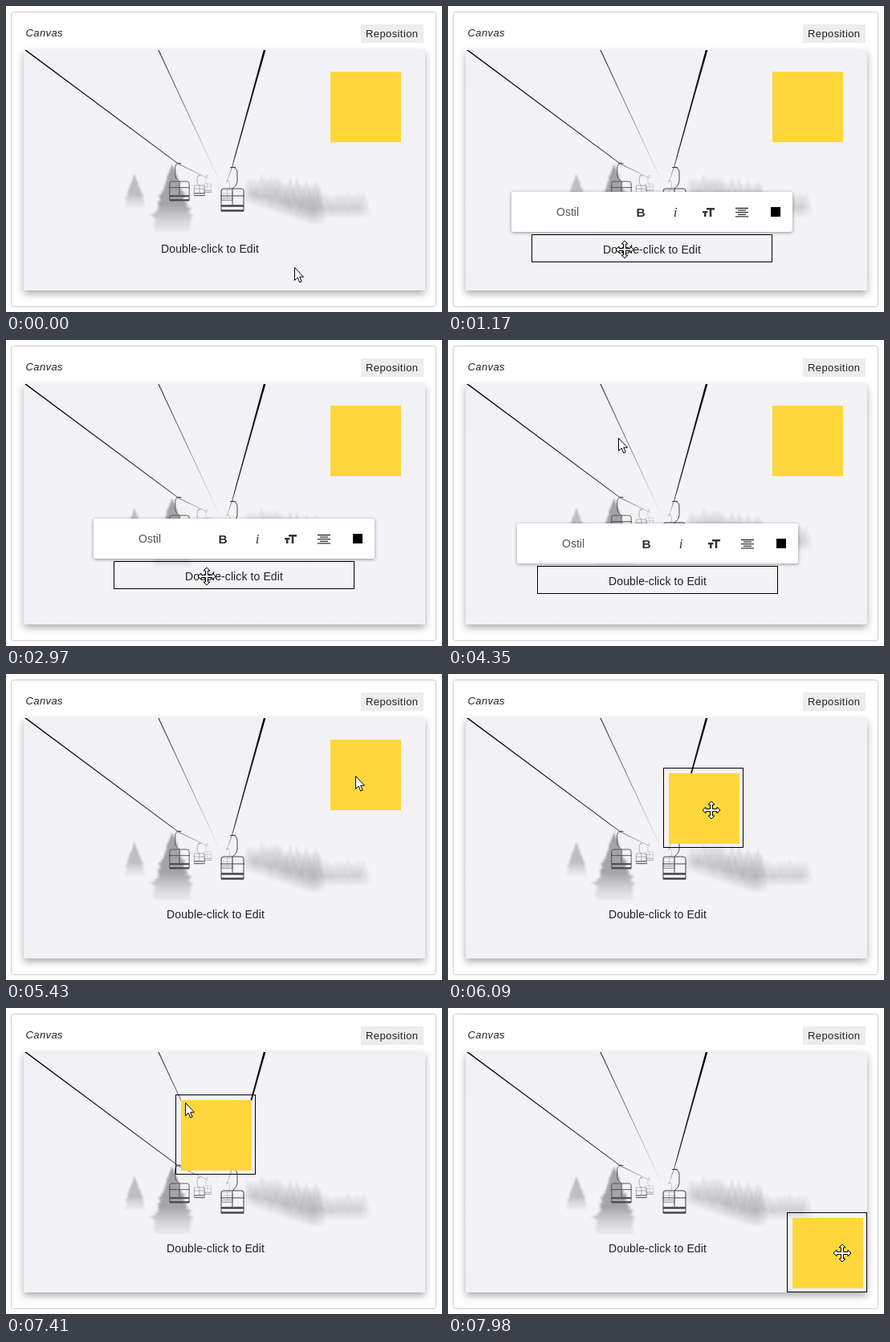
Write an HTML page that moves like this. It is 543 px wide and 382 px high and loops after 8000 ms.

```html
<!DOCTYPE html>
<html lang="en">
<head>
<meta charset="utf-8">
<title>Canvas editor</title>
<style>
  html, body { margin: 0; width: 100%; height: 100%; overflow: hidden; background: #fff; }
  svg { display: block; width: 543px; height: 382px; font: 14px "Liberation Sans", sans-serif; }
  .heading { font-size: 13px; letter-spacing: .4px; fill: #222; }
  .photo { filter: drop-shadow(0 4px 5px #0005); }
  .panel { filter: drop-shadow(0 1px 2px #0006); }
  .line { fill: none; stroke: #000; }
  .pointer { fill: #fff; stroke: #000; }
</style>
</head>
<body>
<svg viewBox="0 0 543 382">
  <defs>
    <linearGradient id="snow" x2="0" y2="1">
      <stop stop-color="#f2f1f5"/>
      <stop offset=".7" stop-color="#f4f3f7"/>
      <stop offset="1" stop-color="#f2f1f5"/>
    </linearGradient>
    <linearGradient id="fir" x2="0" y2="1">
      <stop stop-color="#828187" stop-opacity=".8"/>
      <stop offset=".6" stop-color="#87868c" stop-opacity=".8"/>
      <stop offset="1" stop-color="#b3b2b8" stop-opacity=".15"/>
    </linearGradient>
    <linearGradient id="cable" gradientUnits="userSpaceOnUse" x1="0" y1="55" x2="0" y2="220">
      <stop stop-color="#000"/>
      <stop offset=".8" stop-color="#333"/>
      <stop offset="1" stop-color="#ccc"/>
    </linearGradient>
    <linearGradient id="fade" gradientUnits="userSpaceOnUse" x1="0" y1="55" x2="0" y2="215">
      <stop stop-color="#333"/>
      <stop offset=".5" stop-color="#777"/>
      <stop offset="1" stop-color="#ddd"/>
    </linearGradient>
    <g id="chair" fill="none" stroke="#444">
      <path d="M15 0Q21-4 21-9V-21Q20-27 14-27M12-26.5H19"/>
      <path d="M1 28V3Q1 0 4 0H26Q29 0 29 3V28M0 9H30M15 0V20"/>
      <path d="M1 21.5H29M1 27.5H29" stroke-width="2.4"/>
    </g>
  </defs>

  <rect x="6.5" y="7.5" width="529" height="368" rx="3" fill="#fff" stroke="#ccc"/>
  <text class="heading" x="24.5" y="38" font-style="italic">Canvas</text>
  <rect x="442" y="23" width="78" height="23" fill="#ededed"/>
  <text class="heading" x="448" y="39">Reposition</text>

  <rect class="photo" x="22" y="55" width="500" height="300" fill="url(#snow)"/>
  <g id="trees" fill="url(#fir)" style="filter:blur(1px)"></g>
  <g fill="url(#cable)">
    <path d="M23 55H25.500L215 196.800 252 215 251.700 215.500 214.500 197.600Z"/>
    <path d="M320.800 55H323.400L282.400 200 274.500 222 274 221.800 281.300 200Z"/>
    <path fill="url(#fade)" d="M189.300 55H190.600L264.500 215H264Z"/>
  </g>
  <use href="#chair" transform="translate(267 228)"/>
  <use href="#chair" transform="translate(229 219) scale(-.87 .85)"/>
  <use href="#chair" transform="translate(248 224) scale(-.47 .46)" opacity=".8"/>
  <use href="#chair" transform="translate(256 222) scale(-.34 .38)" opacity=".5"/>
  <use href="#chair" transform="translate(268 230) scale(.5 .45)" opacity=".5"/>

  <g id="tile">
    <rect x="7" y="7" width="88" height="88" fill="#ffd63c"/>
    <rect id="tileFrame" class="line" x=".5" y=".5" width="99" height="99"/>
  </g>

  <g id="label">
    <text id="caption" x="150" text-anchor="middle" letter-spacing=".1" fill="#222">Double-click to Edit</text>
    <g id="editor">
      <rect class="line" x=".5" y=".5" width="299" height="34"/>
      <g transform="translate(-25 -53)" fill="#333">
        <rect class="panel" width="350" height="50" rx="3" fill="#fff"/>
        <text x="56" y="30" fill="#555">Ostil</text>
        <text x="161" y="30.500" text-anchor="middle" font-size="15.500" font-weight="bold">B</text>
        <text x="204" y="30.500" text-anchor="middle" font-size="17" font-style="italic" font-family="Liberation Serif, serif">i</text>
        <path d="M243 20H253V22.500H249.300V31H246.700V22.500H243ZM238 24H244.500V26.300H242.500V31H240V26.300H238Z"/>
        <path class="line" style="stroke:#333" stroke-width="1.300" d="M279 20.500H295M282 23.100H292M279 25.700H295M282 28.300H292M279 30.900H295"/>
        <rect x="323" y="19" width="12" height="12" fill="#000"/>
      </g>
    </g>
  </g>

  <g id="cursor" class="pointer">
    <path id="arrow" d="M.5 .5V16.500L4.200 13 6.700 19 9.200 18 6.700 12.200H11.500Z"/>
    <path id="mover" d="M0-11L4-7H1.500V-1.500H7V-4L11 0 7 4V1.500H1.500V7H4L0 11-4 7H-1.500V1.500H-7V4L-11 0-7-4V-1.500H-1.500V-7H-4Z"/>
  </g>
</svg>
<script>
const LOOP = 8000;
const $ = id => document.getElementById(id);
const clamp = (v, lo, hi) => Math.min(hi, Math.max(lo, v));

const stop = (arrive, x, y, leave = arrive) => ({ arrive, leave, at: [x, y] });

// Where the pointer turns or rests
const STOPS = [
  stop(0, 359, 326, 30), stop(210, 367, 385, 390), stop(420, 340, 346),
  stop(1110, 220, 304, 1500), stop(2040, 24, 292), stop(2400, 345, 263),
  stop(2970, 250, 295), stop(3300, 227, 301, 3720), stop(4290, 212, 122, 4770),
  stop(5580, 457, 128, 5790), stop(6090, 328, 170), stop(6570, 92, 143),
  stop(6780, 13, 62), stop(7050, 22, 64), stop(7410, 222, 118),
  stop(7830, 432, 241), stop(7980, 491, 306, LOOP)
];

function slope(i, axis) {
  const a = STOPS[i], b = STOPS[i + 1];
  return (b.at[axis] - a.at[axis]) / (b.arrive - a.leave);
}

// Zero at rests and turns; the harmonic mean elsewhere avoids overshoot
function tangent(i, axis) {
  if (STOPS[i].leave > STOPS[i].arrive) return 0;
  const a = slope(i - 1, axis), b = slope(i, axis);
  return a * b > 0 ? 2 * a * b / (a + b) : 0;
}

function pointer(t) {
  const i = STOPS.findLastIndex(s => s.arrive <= t);
  const a = STOPS[i], b = STOPS[i + 1];
  if (t <= a.leave) return a.at;
  const span = b.arrive - a.leave, u = (t - a.leave) / span;
  return a.at.map((from, axis) =>
    from + (b.at[axis] - from) * u * u * (3 - 2 * u) +
    span * u * (1 - u) * (tangent(i, axis) * (1 - u) - tangent(i + 1, axis) * u));
}

function labelAt(t) {
  const [x, y] = pointer(clamp(t, 1500, 3300));
  return [clamp(x - 116, 24, 222), y - 19];
}

// The tile is grabbed twice, the second time near its corner
function tileAt(t) {
  const [x, y] = pointer(Math.max(t, 5790));
  const [dx, dy] = t < 6950 ? [60, 53] : [12, 10];
  return [clamp(x - dx, 22, 422), clamp(y - dy, 55, 255)];
}

function place(id, [x, y]) {
  $(id).setAttribute("transform", `translate(${Math.round(x)} ${Math.round(y)})`);
}

function show(id, visible) {
  $(id).style.display = visible ? "" : "none";
}

function inside([x, y], [left, top], width, height, margin) {
  return x > left + margin && x < left + width - margin &&
         y > top + margin && y < top + height - margin;
}

function draw(t) {
  const tip = pointer(t), label = labelAt(t), tile = tileAt(t);
  const editing = t >= 1110 && t < 4470, selected = t >= 5520;
  const moving = editing && inside(tip, label, 300, 35, 4) ||
                 selected && inside(tip, tile, 100, 100, 14);
  place("label", label);
  place("tile", tile);
  place("cursor", tip);
  $("caption").setAttribute("y", editing ? 24 : 23);
  show("editor", editing);
  show("tileFrame", selected);
  show("arrow", !moving);
  show("mover", moving);
}

let seed = 7;
function random() {
  seed = seed * 16807 % 2147483647;
  return seed / 2147483647;
}

function fir(x, top, bottom, half, opacity) {
  const tiers = Math.round((bottom - top) / 4), right = [], left = [];
  for (let i = 1; i <= tiers; i++) {
    const y = top + (bottom - top) * i / tiers;
    const reach = half * Math.min(1, 1.3 * i / tiers);
    const branch = side => {
      const w = side * reach * (.75 + .3 * random());
      return [`${x + w} ${y - 1}`, `${x + w * .8} ${y}`];
    };
    right.push(...branch(1));
    left.unshift(...branch(-1).reverse());
  }
  return `<path opacity="${opacity}" d="M${x} ${top}L${[...right, ...left].join("L")}Z"/>`;
}

// A forest that descends to the right, then thins out into the mist
function forest() {
  let trees = "";
  for (let x = 302; x < 450; x += 4) {
    const depth = Math.min(1, (x - 302) / 80), thin = x > 392;
    const top = 207 + 9 * depth + 9 * random() + (thin ? 12 : 0);
    trees += fir(x, top, thin ? 264 : 246 + 26 * depth, 10, thin ? .13 : .15 + .13 * depth);
  }
  return trees;
}

$("trees").innerHTML =
  fir(160, 210, 252, 14, .6) + fir(207, 198, 282, 29, .9) + forest();

function frame(now) {
  draw(now % LOOP);
  requestAnimationFrame(frame);
}
draw(0);
requestAnimationFrame(frame);
</script>
</body>
</html>
```
